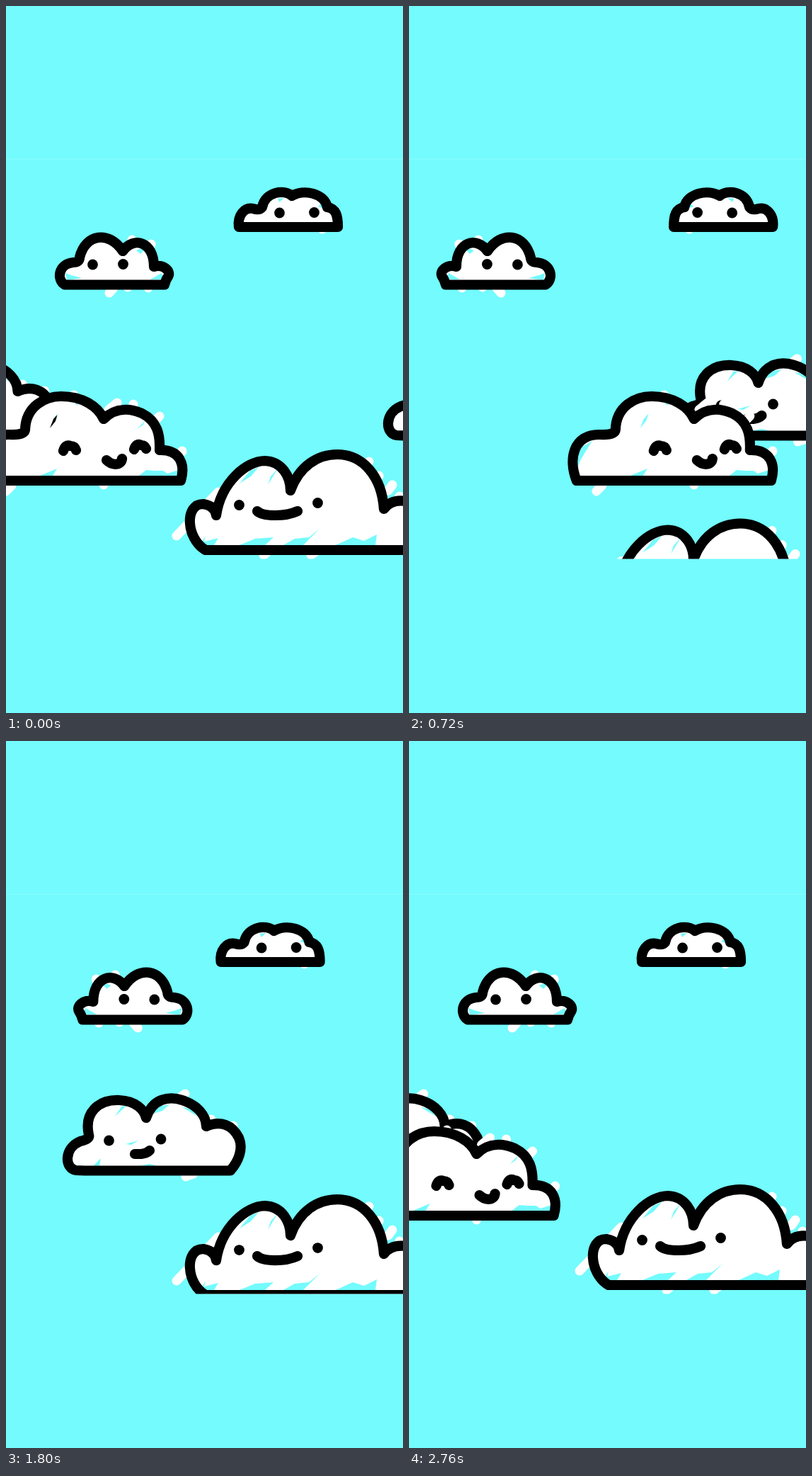
These frames come from a looping animation (561 px wide and 998 px high, 2.88 s). An HTML page:

```html
<!DOCTYPE html>
<html lang="en">
<head>
<meta charset="utf-8">
<title>Drifting clouds</title>
<style>
  html, body { margin: 0; width: 100%; height: 100%; overflow: hidden; background: #73fbfd; }
  svg { display: block; }
  .line { fill: none; stroke: #000; stroke-width: 14.2; stroke-linecap: round; stroke-linejoin: round; }
  .smudge { fill: none; stroke: #fff; stroke-width: 13; stroke-linecap: round; }
</style>
</head>
<body>
<svg width="561" height="998" viewBox="0 0 561 998">
  <clipPath id="sky"><rect width="561" height="780.5"/></clipPath>
  <rect y="215.5" width="561" height="1" fill="#fff" opacity=".2"/>
  <g id="clouds" clip-path="url(#sky)"></g>
</svg>
<script>
const STEP = 120, STEPS = 24, SPAN = 719.5, HOP = 14.1;
const layer = document.getElementById('clouds');

// body: outline, gaps: unpainted slivers, smudge: paint outside the line
function addCloud({ body, gaps, smudge, eyes = [], lines = '' }) {
  const g = document.createElementNS('http://www.w3.org/2000/svg', 'g');
  g.innerHTML = `<path class="smudge" d="${smudge}"/>
    <path fill="#fff" fill-rule="evenodd" d="${body + gaps}"/>
    <path class="line" d="${body + lines}"/>` +
    eyes.map(([x, y]) => `<circle cx="${x}" cy="${y}" r="7.4"/>`).join('');
  return layer.appendChild(g);
}

const right = addCloud({
  body: 'M329 312C327 295 337 284 349 286Q358 289 362 284C366 262 394 258 404 268C420 258 450 264 454 284C466 286 469 295 469 312Z',
  gaps: 'M384 272L393 271L386 277ZM441 283L449 276L450 286Z',
  smudge: 'M447 314v1',
  eyes: [[386.5, 292], [435.5, 291.5]]
});

const left = addCloud({
  body: 'M83 393.5C71 386 74 364 95 362Q104 362 104 355C112 321 146 317 165 346C180 325 209 332 209 368C222 364 234 374 229 382Q226 386 224 393.5Z',
  gaps: 'M84 377L92 380L107 384L86 387ZM184 345L200 339L190 350ZM204 386L220 377L223 386Z',
  smudge: 'M152 398L146 405M172 396v1M201 397v1M178 330v1M205 336v1',
  eyes: [[122.5, 365], [165.5, 364.5]]
});

const smile = {
  body: 'M108 606.5L96 606C80 604 78 575 102 565Q116 562 114 556C107 524 128 506 157 507C180 508 192 520 195 532C204 504 228 501 246 507C266 513 280 528 280 544C300 535 317 542 326 560C333 576 325 594 314 606.5Z',
  gaps: 'M151 530L160 516L167 515ZM202 527L212 516L228 513L218 522ZM246 517L258 519L268 530ZM166 569L184 564L174 570ZM120 600L131 589L129 600ZM184 600L200 597L212 600Z',
  smudge: 'M238 507L250 498M287 534v1M318 543v1M262 611L251 615',
  eyes: [[142.5, 564], [216, 562]],
  lines: 'M179 583L188 583Q196 582 200 578'
};
const smiles = [addCloud(smile), addCloud(smile)];

const happy = addCloud({
  body: 'M152 670C140 640 147 604 185 605Q206 606 207 598C208 565 235 551 258 551C288 551 310 565 318 583C336 565 358 569 372 575C394 586 398 605 397 627C425 626 434 646 427 670Z',
  gaps: 'M254 575L250 586L242 596L247 583ZM278 557L282 564L278 562ZM377 585L373 592L365 597ZM152 640L157 624L174 614L158 640L153 652ZM228 663L252 653L246 663ZM368 663L378 655L390 656L402 656L408 660L424 655L422 663Z',
  smudge: 'M188 677L180 685M318 675v1M276 549v1M325 570L337 560M360 562v1M388 588L397 579M429 628v1',
  lines: 'M261 628Q264 618 271 621Q277 621 279 627M361 626Q364 616 371 620Q376 620 378 625M322 641C330 649 343 649 344 639'
});

const big = addCloud({
  body: 'M282 768C254 752 252 702 279 703Q296 706 297 719C304 672 340 642 366 642C390 643 402 664 402 684C414 650 440 633 468 633C505 633 531 665 534 710Q544 696 565 699L640 768Z',
  gaps: 'M330 674L345 656L357 651L346 664ZM370 676L374 664L384 653ZM274 761L282 748L280 756L300 751L294 761ZM330 761L352 752L378 750L366 761ZM392 761L408 752L428 750L443 738L420 761ZM466 761L490 750L506 755L524 746L522 761Z',
  smudge: 'M300 686L241 748M508 648L513 643M527 663v1M540 684L546 676M556 692v1M368 772L364 775M438 770L431 775',
  eyes: [[329.5, 704.5], [440.5, 701.5]],
  lines: 'M355 713C363 721 395 721 412 713'
});

function move(el, x, y = 0) {
  el.setAttribute('transform', `translate(${x} ${y})`);
}

// Small clouds hop away from home, turn and wander back, then hurry home.
function wander(el, s, { from, to, dir, home, back, delay, most, turns }) {
  const hops = s < 6 ? s >> 1 : s < 20 ? Math.min(most, (s - delay) >> 1) : s - 23;
  const x = s < 6 || s >= 20 ? home + dir * HOP * hops : back - dir * HOP * hops;
  const mirrored = turns.filter(t => t <= s).length % 2;
  if (mirrored) el.setAttribute('transform', `translate(${x + to} 0) scale(-1 1)`);
  else move(el, x - from);
}
const rightWalk = { from: 322, to: 476, dir: 1, home: 322, back: 353, delay: 7, most: 5, turns: [6, 15, 17, 20] };
const leftWalk = { from: 69, to: 237, dir: -1, home: 69, back: 53, delay: 8, most: 4, turns: [6, 20] };

// The smiling cloud blows left in gusts: [step, x]
const gusts = [[0, 456], [4, 371], [8, 226], [11, 99], [19, -93], [24, 456 - SPAN]];
function smileX(s) {
  const n = gusts.findIndex(([step]) => step > s);
  const [s0, x0] = gusts[n - 1], [s1, x1] = gusts[n];
  return x0 + (x1 - x0) * (s - s0) / (s1 - s0);
}

// Steady drift to the right, entering again from the left
const happyX = s => s > 0 && s < 16 ? 42.4 * (s - 4) : 42.5 * ((s || STEPS) - STEPS) - 180;

// Sinks, climbs back a little too far, then settles
const bigY = s => Math.max(s - 23, Math.min(16.25 * s, HOP * (16 - s)), -4);

function draw() {
  const s = Math.floor(performance.now() / STEP) % STEPS;
  wander(right, s, rightWalk);
  wander(left, s, leftWalk);
  smiles.forEach((el, n) => move(el, smileX(s) - n * SPAN));
  move(happy, happyX(s));
  move(big, 0, bigY(s));
  requestAnimationFrame(draw);
}
draw();
</script>
</body>
</html>
```
